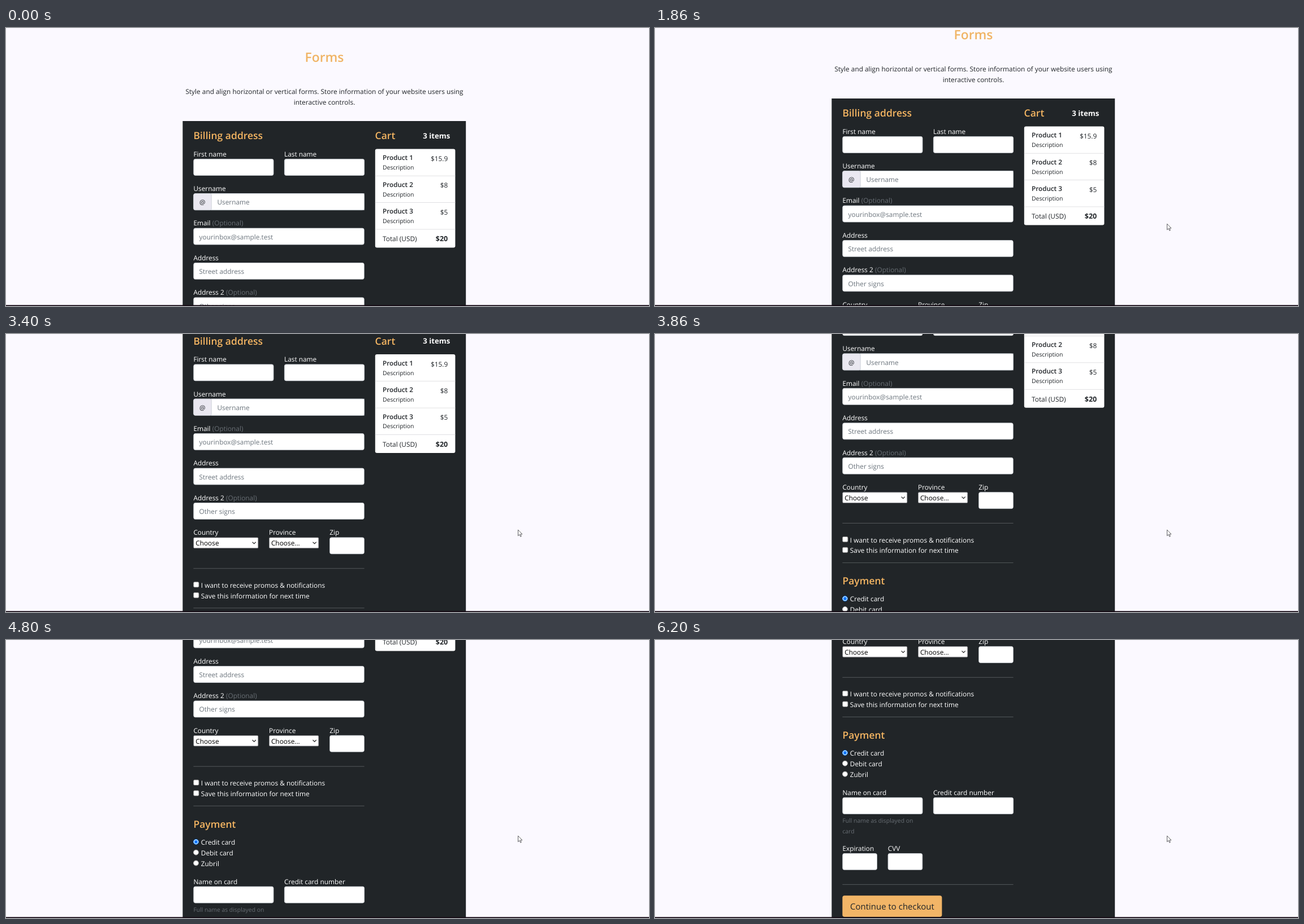
Write an HTML page that moves like this. It is 1137x493 px and loops after 7 s.

```html
<!DOCTYPE html>
<html lang="en">
<head>
<meta charset="utf-8">
<title>Forms</title>
<style>
  html, body { margin: 0; width: 100%; height: 100%; overflow: hidden; background: #fbf9ff; }
  svg { display: block; width: 100%; height: 100%; }
  text { font: 11.87px "Open Sans", "Noto Sans", sans-serif; fill: #212529; text-rendering: geometricPrecision; }
  .title { font-size: 22.8px; font-weight: 600; fill: #f0b465; }
  .head { font-size: 17.5px; font-weight: 600; fill: #f4b562; }
  .label { fill: #fff; }
  .muted { fill: #686e74; }
  .hint { fill: #6c757d; }
  .small { font-size: 10.4px; }
  .semi { font-size: 11.7px; font-weight: 600; }
  .count { font-size: 13.2px; font-weight: 700; fill: #fff; }
  .sum { font-size: 12.5px; font-weight: 700; }
  .pick { fill: #000; }
  .action { font-size: 15px; }
  .mid { text-anchor: middle; }
  .end { text-anchor: end; }
</style>
</head>
<body>
<svg viewBox="0 0 1137 493" preserveAspectRatio="none">
  <rect width="1137" height="493" fill="#fbf9ff"/>
  <g id="page"></g>
  <path id="pointer" d="M.5.5v10.6l2.5-2.3 1.7 3.8 1.6-.7-1.7-3.7h3.3z" fill="#fff" stroke="#3a3a3e" stroke-width=".8"/>
  <rect y="491.3" width="1137" height="2" fill="#150a14"/>
</svg>
<script>
const LOOP = 7000;
const LEFT = 331.4, RIGHT = 633.6, COLUMN = 492;
const page = document.getElementById('page');
const pointer = document.getElementById('pointer');

function add(tag, attrs, content) {
  const node = document.createElementNS('http://www.w3.org/2000/svg', tag);
  for (const name in attrs) node.setAttribute(name, attrs[name]);
  if (content) node.textContent = content;
  page.append(node);
  return node;
}

const text = (x, y, content, style = 'label') => add('text', { x, y, class: style }, content);

const box = (x, y, width, height, fill = '#fff', rx = 0, stroke = 'none') =>
  add('rect', { x, y, width, height, fill, rx, stroke, 'stroke-width': 0.8 });

const rule = y => box(LEFT, y - 0.5, RIGHT - LEFT, 1, '#54585b');

function field(x, top, width, label, hint, optional) {
  const caption = text(x, top - 4.3, label);
  if (optional) {
    const note = document.createElementNS(caption.namespaceURI, 'tspan');
    note.setAttribute('class', 'muted');
    note.textContent = ' (Optional)';
    caption.append(note);
  }
  box(x + 0.4, top + 0.4, width - 0.8, 29, '#fff', 3, '#ced4da');
  if (hint) text(x + 10.2, top + 20, hint, 'hint');
}

function select(x, width, label, value) {
  text(x, 534.7, label);
  box(x + 0.4, 539.6, width - 0.8, 18.6, '#fff', 1.5, '#8a8a8e');
  text(x + 3.8, 553.8, value, 'pick');
  add('path', { d: `M${x + width - 10.6} 547.4l3.1 3.1 3.1-3.1`, fill: 'none', stroke: '#222', 'stroke-width': 1.2 });
}

function checkbox(y, label) {
  box(LEFT + 0.2, y - 4.8, 9.4, 9.4, '#fff', 1.8, '#767676');
  text(344.8, y + 5.3, label);
}

function radio(y, label, checked) {
  const dot = (r, fill, stroke) => add('circle', { cx: 336, cy: y, r, fill, stroke, 'stroke-width': 1 });
  dot(4.5, '#fff', checked ? '#0075ff' : '#a0a0a0');
  if (checked) dot(2.9, '#0075ff', 'none');
  text(344.8, y + 5.2, label);
}

function buildIntro() {
  text(563, 59.7, 'Forms', 'title mid');
  text(563, 116.7, 'Style and align horizontal or vertical forms. Store information of your website users using', 'mid');
  text(563, 135.5, 'interactive controls.', 'mid');
  box(312.4, 165, 500.8, 1000, '#212528');
}

function buildBilling() {
  text(LEFT, 197, 'Billing address', 'head');
  field(LEFT, 232, 142, 'First name');
  field(COLUMN, 232, 142, 'Last name');
  const full = RIGHT - LEFT;
  field(LEFT, 293.3, full, 'Username');
  box(363, 293.7, RIGHT - 363.4, 29, '#fff', 0, '#ced4da');
  box(LEFT + 0.4, 293.7, 31.4, 29, '#eae8f1', 2.5, '#ced4da');
  text(347.4, 313.3, '@', 'mid');
  text(373.4, 313.3, 'Username', 'hint');
  field(LEFT, 354.7, full, 'Email', 'yourinbox@sample.test', true);
  field(LEFT, 416.2, full, 'Address', 'Street address');
  field(LEFT, 477.6, full, 'Address 2', 'Other signs', true);
  select(LEFT, 114.8, 'Country', 'Choose');
  select(465.1, 88, 'Province', 'Choose...');
  field(572.2, 539, 61.5, 'Zip');
  rule(594.3);
  checkbox(623, 'I want to receive promos & notifications');
  checkbox(641.8, 'Save this information for next time');
  rule(664.4);
}

function buildPayment() {
  text(LEFT, 702.8, 'Payment', 'head');
  radio(728, 'Credit card', true);
  radio(746.8, 'Debit card');
  radio(765.7, 'Zubril');
  field(LEFT, 807, 142, 'Name on card');
  field(COLUMN, 807, 142, 'Credit card number');
  text(LEFT, 851.7, 'Full name as displayed on', 'muted small');
  text(LEFT, 870.5, 'card', 'muted small');
  field(LEFT, 906.2, 61.5, 'Expiration');
  field(411.7, 906.2, 61.5, 'CVV');
  rule(961.6);
  box(LEFT, 981.2, 176, 37.8, '#f2b567', 3.8);
  text(419.4, 1006, 'Continue to checkout', 'action mid');
}

function buildCart() {
  text(652.6, 197.4, 'Cart', 'head');
  text(785.2, 195.5, '3 items', 'count end');
  box(652.8, 214.5, 141.6, 175, '#fff', 3.2);
  ['$15.9', '$8', '$5'].forEach((price, i) => {
    const y = 214.5 + i * 47.4;
    text(666, y + 19.7, `Product ${i + 1}`, 'semi');
    text(666, y + 36.6, 'Description', 'small');
    text(781.2, y + 21.5, price, 'end');
    box(652.8, y + 47.3, 141.6, 0.8, '#d9d9dc');
  });
  text(666, 378.3, 'Total (USD)', '');
  text(781.2, 378.3, '$20', 'sum end');
}

buildIntro();
buildBilling();
buildPayment();
buildCart();

// [time, scroll distance]
const scrollSteps = [
  [1400, 0], [1900, 40], [2400, 94], [2500, 94], [2600, 112], [3400, 178.5],
  [4400, 339], [4500, 339], [5300, 422], [6200, 528]
];

function scrollAt(time) {
  const next = scrollSteps.findIndex(step => step[0] >= time);
  if (next === 0) return 0;
  if (next < 0) return scrollSteps[scrollSteps.length - 1][1];
  const [t0, y0] = scrollSteps[next - 1], [t1, y1] = scrollSteps[next];
  return y0 + (y1 - y0) * (time - t0) / (t1 - t0);
}

// Ten poses a second, each second one shown 40 ms early.
function poseTime(time) {
  const rest = time % 200;
  return time - rest + (rest >= 60 ? 100 : 0);
}

function draw() {
  const time = poseTime(performance.now() % LOOP);
  page.setAttribute('transform', `translate(0 ${-scrollAt(time)})`);
  const p = Math.min(1, Math.max(0, (time - 400) / 500));
  const away = (1 - p) ** 2;
  pointer.setAttribute('transform', `translate(${905 - 30 * away} ${346.8 + 148 * away})`);
  requestAnimationFrame(draw);
}
draw();
</script>
</body>
</html>
```
